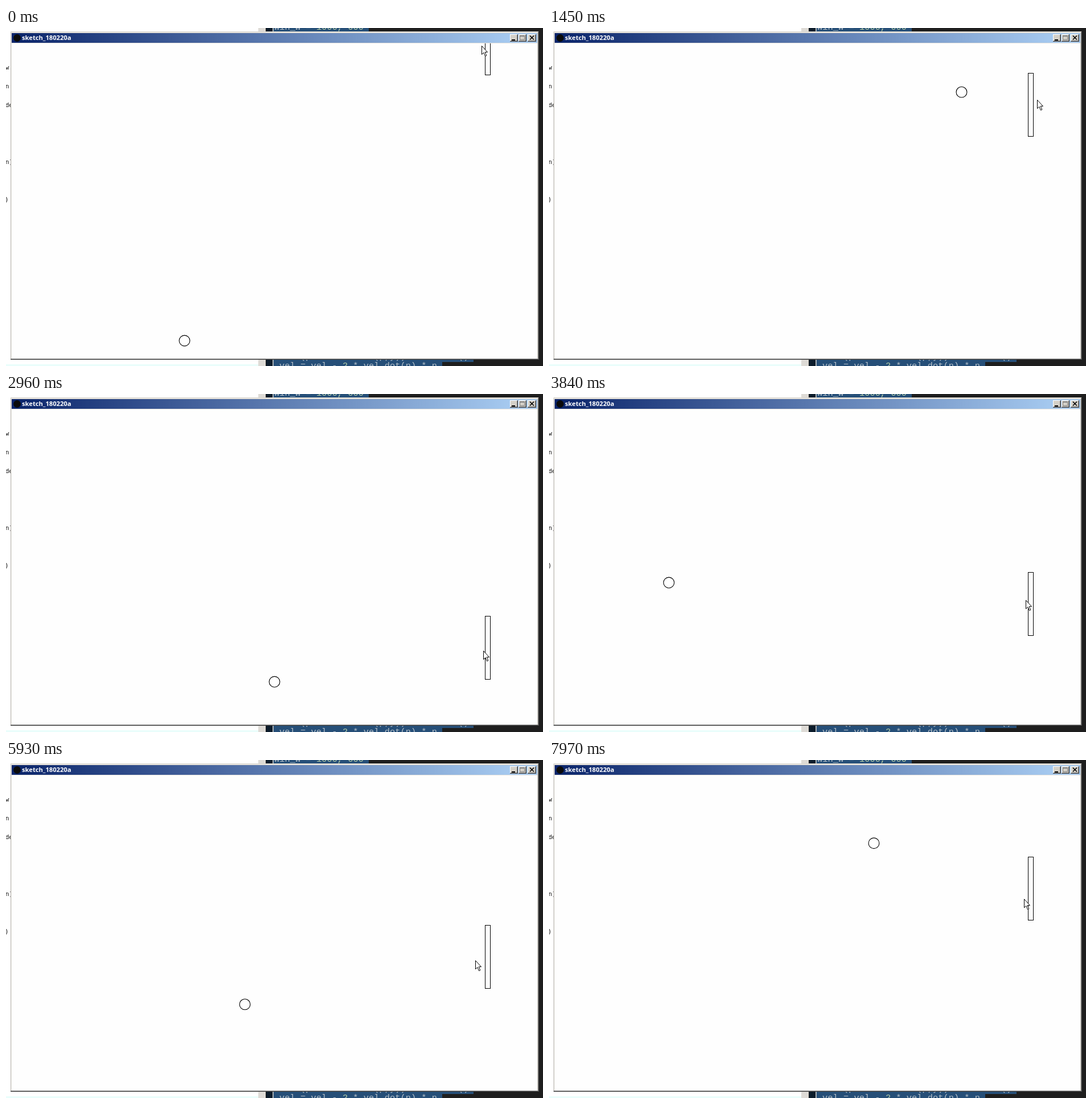
Write an HTML page with a canvas that moves like this. It is 943 px wide and 594 px high and loops after 8 s.

```html
<!DOCTYPE html>
<html lang="en">
<head>
<meta charset="utf-8">
<title>Paddle sketch</title>
<style>
  html, body { margin: 0; width: 100%; height: 100%; overflow: hidden; background: #fff; }
  canvas { display: block; }
</style>
</head>
<body>
<canvas id="stage" width="943" height="594"></canvas>
<script>
const W = 943, H = 594, LOOP = 8000;
const ctx = document.getElementById('stage').getContext('2d');

// Limits for the ball centre, its start and its vertical travel per horizontal pixel
const FIELD = { left: 20.5, right: 831.5, top: 36.5, bottom: 571.1 };
const BALL = { x: 313.5, y: 549.5, r: 9.4, slope: 1.168 };
const PADDLE = { x: 841.5, w: 9, h: 111 };

const FRAME = 47;                          // ms between redraws
const PAUSE = { at: 4690, length: 145 };   // the picture stalls once
const LAG = 45;                            // ms the paddle trails the mouse

// Time without the stall
const running = t => t - Math.min(Math.max(t - PAUSE.at, 0), PAUSE.length);

// ms, ball travel in x, paddle centre, mouse lead over the paddle, mouse x
const KEYS = [
  [0, 0, 27, 4, 835],
  [1450, 411, 135, -9, 857],
  [2530, 745, 290, 15, 846],
  [2960, 878, 446, 5, 838],
  [3840, 1139, 368.5, -6.5, 837],
  [5240, 1502, 268, 3, 796],
  [6570, 1954, 369.5, -4.5, 851],
  [7970, 2401, 225.5, 18.5, 834]
].map(([t, travel, paddle, lead, mouse]) =>
  ({ t: running(t), travel, paddle, speed: lead / LAG, mouse }));

const mix = (a, b, u) => a + (b - a) * u;

// Reflects an unbounded coordinate between two walls
function fold(v, lo, hi) {
  const span = hi - lo, m = (v - lo) % (2 * span);
  return lo + (m > span ? 2 * span - m : m);
}

// Cubic through two keys with their speeds: position and speed at u
function glide(a, b, d, u) {
  const rise = b.paddle - a.paddle, m0 = a.speed * d, m1 = b.speed * d;
  const c2 = 3 * rise - 2 * m0 - m1, c3 = m0 + m1 - 2 * rise;
  return {
    y: a.paddle + u * (m0 + u * (c2 + u * c3)),
    speed: (m0 + u * (2 * c2 + u * 3 * c3)) / d
  };
}

function pose(time) {
  const t = running(time);
  const i = Math.min(KEYS.findLastIndex(k => k.t <= t), KEYS.length - 2);
  const a = KEYS[i], b = KEYS[i + 1], d = b.t - a.t;
  const count = Math.round(d / FRAME);
  const u = Math.min(Math.floor((t - a.t) / d * count + 1e-6) / count, 1);
  const travel = mix(a.travel, b.travel, u);
  const paddle = glide(a, b, d, u);
  return {
    ballX: fold(BALL.x + travel, FIELD.left, FIELD.right),
    ballY: fold(BALL.y + BALL.slope * travel, FIELD.top, FIELD.bottom),
    paddleY: paddle.y,
    mouseX: mix(a.mouse, b.mouse, u * u * (3 - 2 * u)),
    mouseY: paddle.y + LAG * paddle.speed
  };
}

function box(g, color, x, y, w, h) {
  g.fillStyle = color;
  g.fillRect(x, y, w, h);
}

function label(g, text, x, y, font, color) {
  g.font = font;
  g.fillStyle = color;
  g.fillText(text, x, y);
}

function drawEditors(g) {
  box(g, '#fff', 0, 0, 443, H);
  box(g, '#e9fdfb', 0, 591, 443, 3);
  const mono = '11px "DejaVu Sans Mono", monospace';
  ['w', 'n', 'de', '', '', 'n)', '', ')'].forEach((s, row) =>
    label(g, s, s === ')' ? -2 : -1.3, 73 + row * 33.1, mono, '#111'));

  box(g, '#dedbd6', 443, 0, 13, H);
  box(g, '#1e1e1e', 456, 0, W - 456, H);
  box(g, '#0c1c2b', 457, 0, 11, H);
  box(g, '#a9b0b5', 468, 0, 2, H);

  const code = '15.4px "Liberation Mono", monospace', cell = 9.24;
  const ink = '#b4bfc8', number = '#b5cea8', selected = '#264f78';
  box(g, selected, 470, 0, 167, 6);
  label(g, 'win_w =', 471, 2.5, code, ink);
  label(g, '1000, 600', 471 + 8 * cell, 2.5, code, number);

  box(g, selected, 470, 580, 351, 7);
  box(g, selected, 470, 587, 296, 7);
  label(g, 'n = (point - coord(p,y)).normalize()', 480, 581.5, code, ink);
  label(g, 'vel = vel -   * vel.dot(n) * n', 480, 597.5, code, ink);
  label(g, '2', 480 + 12 * cell, 597.5, code, number);
}

function drawButton(g, x, w) {
  box(g, '#404040', x, 11, w, 13);
  box(g, '#fff', x, 11, w - 1, 12);
  box(g, '#808080', x + 1, 12, w - 2, 11);
  box(g, '#d4d0c8', x + 1, 12, w - 3, 10);
}

function drawWindow(g) {
  box(g, '#d4d0c8', 8, 6, 927, 577);
  box(g, '#f4f2ee', 9, 7, 925, 1);
  box(g, '#b8b5b0', 8, 8, 1, 574);
  box(g, '#f0eeea', 9, 8, 1, 574);
  box(g, '#808080', 934, 7, 1, 576);
  box(g, '#404040', 935, 6, 1, 577);
  box(g, '#808080', 8, 581, 927, 1);
  box(g, '#404040', 8, 582, 928, 1);

  const sky = g.createLinearGradient(10, 0, 890, 0);
  sky.addColorStop(0, '#0a246a');
  sky.addColorStop(1, '#a6caf0');
  box(g, sky, 10, 9, 923, 17);
  g.fillStyle = '#0b0b0b';
  g.beginPath();
  g.arc(19.5, 17.5, 6.5, 0, 7);
  g.fill();
  label(g, 'sketch_180220a', 28, 21, 'bold 11.2px "Open Sans", sans-serif', '#fff');

  drawButton(g, 885, 14);
  drawButton(g, 900, 14);
  drawButton(g, 916, 15);
  box(g, '#000', 888, 20, 6, 2);
  g.lineWidth = 1;
  g.strokeStyle = '#808080';
  g.strokeRect(902.5, 13.5, 8, 7);
  box(g, '#808080', 902, 13, 9, 2);
  g.strokeStyle = '#000';
  g.lineWidth = 1.6;
  g.stroke(new Path2D('M920 13.5l7 7m0-7l-7 7'));

  box(g, '#fefefe', 10, 26, 923, 555);
  box(g, '#e4e2dd', 10, 26, 923, 1);
}

const backdrop = document.createElement('canvas');
backdrop.width = W;
backdrop.height = H;
drawEditors(backdrop.getContext('2d'));
drawWindow(backdrop.getContext('2d'));

const arrow = new Path2D('M0 0V15l3.4-3.2 2.6 6.2 2.3-1-2.6-6.1H10Z');

function draw(time) {
  const { ballX, ballY, paddleY, mouseX, mouseY } = pose(time);
  ctx.drawImage(backdrop, 0, 0);
  ctx.strokeStyle = '#000';
  ctx.fillStyle = '#fff';

  ctx.save();
  ctx.beginPath();
  ctx.rect(10, 27, 923, 554);
  ctx.clip();
  ctx.lineWidth = 1.1;
  ctx.beginPath();
  ctx.arc(ballX, ballY, BALL.r, 0, 7);
  ctx.fill();
  ctx.stroke();

  ctx.lineWidth = 1;
  const top = Math.floor(paddleY - PADDLE.h / 2) + 0.5;
  ctx.fillRect(PADDLE.x, top, PADDLE.w, PADDLE.h);
  ctx.strokeRect(PADDLE.x, top, PADDLE.w, PADDLE.h);
  ctx.restore();

  ctx.save();
  ctx.translate(Math.round(mouseX) + 0.5, Math.round(mouseY) + 0.5);
  ctx.fill(arrow);
  ctx.stroke(arrow);
  ctx.restore();
}

const start = performance.now();
function tick() {
  draw((performance.now() - start) % LOOP);
  requestAnimationFrame(tick);
}
tick();
</script>
</body>
</html>
```
